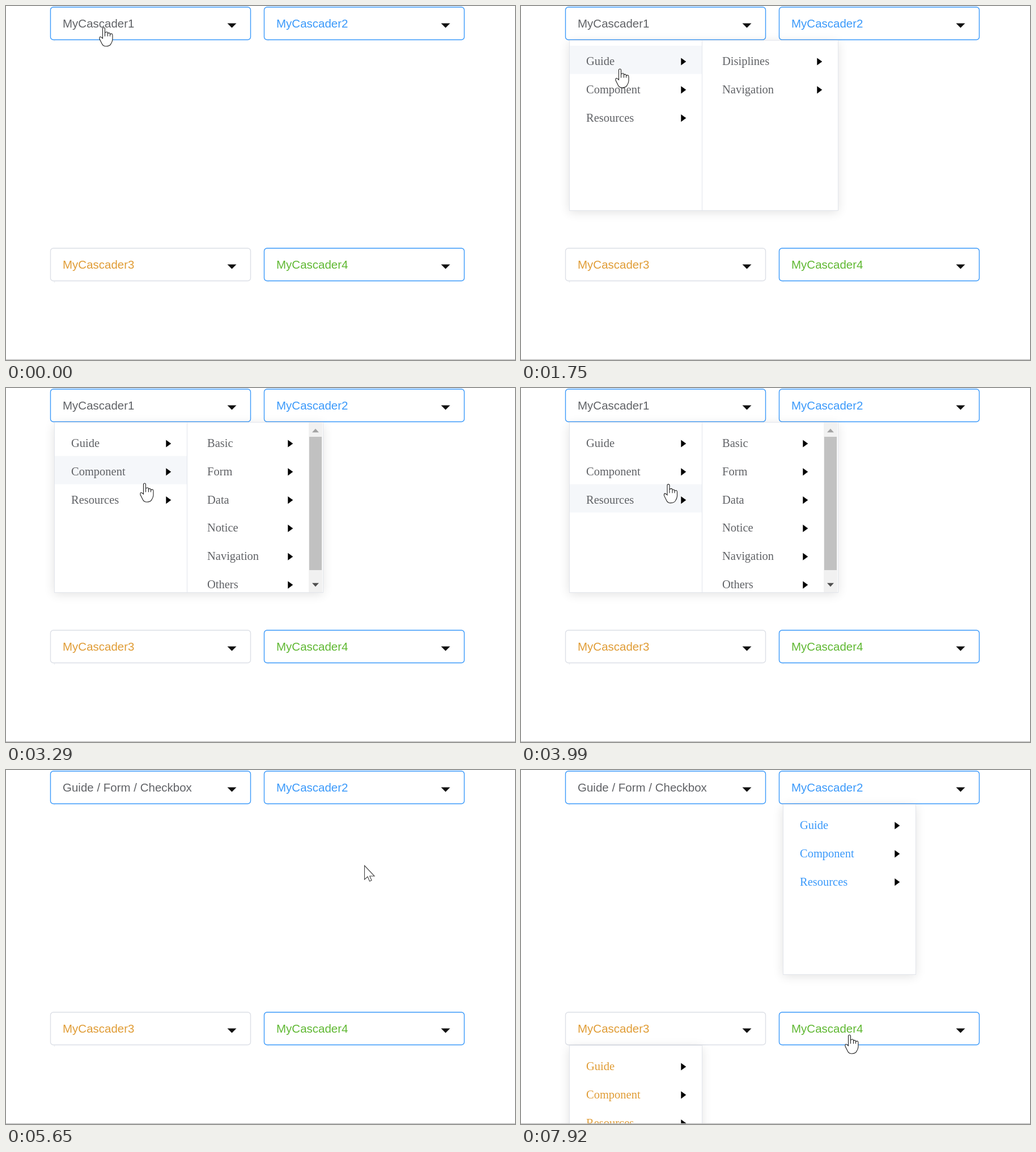
An HTML page with a canvas for the animation above (7.99 s loop, 898 by 624 pixels).

```html
<!DOCTYPE html>
<html lang="en">
<head>
<meta charset="utf-8">
<title>Cascaders</title>
<style>
  html, body { margin: 0; width: 100%; height: 100%; overflow: hidden; background: #fff; }
  canvas { display: block; }
</style>
</head>
<body>
<canvas id="stage" width="898" height="624"></canvas>
<script>
const ctx = document.getElementById('stage').getContext('2d');
const LOOP = 7990, PRESS = 80, DELAY = 230;
const ZOOM = 1.465, ROW = 34 * ZOOM, FONT = 14 * ZOOM;
const COL = 240, FIELD_W = 353, FIELD_H = 57.5, MENU_H = 300;
const BLUE = '#3a99fa', GRAY = '#dcdfe6', LINE = '#e2e5eb';
const SANS = '"Liberation Sans", Arial, sans-serif';
const SERIF = '"Liberation Serif", "Times New Roman", serif';

const MAIN = ['Guide', 'Component', 'Resources'];
const GUIDE = ['Disiplines', 'Navigation'];
const NAV = ['Side Navigation', 'Top Navigation'];
const PARTS = ['Basic', 'Form', 'Data', 'Notice', 'Navigation', 'Others'];
const FORM = ['Radio', 'Checkbox', 'Input', 'InputNumber', 'Select', 'Cascader'];

const FIELDS = ['#606266', BLUE, '#e09c35', '#5fb832'].map((color, n) => ({
  color,
  border: n === 2 ? GRAY : BLUE,
  label: 'MyCascader' + (n + 1),
  x: 78.5 + 377 * (n % 2),
  y: 2 + 425 * Math.floor(n / 2),
}));

// Pointer moves; a click sets the open columns of a menu shortly after
const MOVES = [
  { from: 590, to: 740, x: 176, y: 37, click: 830, menu: 0, cols: [MAIN] },
  { from: 1290, to: 1440, x: 174.5, y: 111, click: 1440, menu: 0, cols: [MAIN, GUIDE] },
  { from: 1750, to: 2140, x: 396, y: 154, click: 2520, menu: 0, cols: [MAIN, GUIDE, NAV] },
  { from: 2750, to: 2980, x: 244.5, y: 168, click: 2980, menu: 0, cols: [MAIN, PARTS] },
  { from: 3890, to: 4460, x: 450, y: 190 },
  { from: 4630, to: 4780, x: 370.5, y: 150, click: 4860, menu: 0, cols: [MAIN, PARTS, FORM] },
  { from: 5090, to: 5420, x: 632, y: 168, click: 5420, menu: 0, cols: [], pick: 'Guide / Form / Checkbox' },
  { from: 5880, to: 6200, x: 615.5, y: 41, click: 6270, menu: 1, cols: [MAIN] },
  { from: 6500, to: 7200, x: 292, y: 431, click: 7220, menu: 2, cols: [MAIN] },
  { from: 7540, to: 7920, x: 579.5, y: 467 },
];

const HAND = new Path2D('M-2 19V2a2 2 0 0 1 4 0V9Q7 6 7 10Q11 8 11 12Q15.5 9 15.5 14V21' +
  'Q15 25 13 28Q11 33 4 33Q-1 33-3 29L-7.5 20Q-8-16-2 19ZM2 9V15.5M7 10V15.5M11 12V15.5'.replace('-8-16', '-8 13'));
const ARROW = new Path2D('M.5.5V25L6 20L9.5 28L13 26.5L9.7 19H18Z');

function stateAt(t) {
  const s = { x: 172.5, y: 38, pressed: false, menus: [[], [], [], []], picked: null };
  for (const m of MOVES) {
    const k = Math.min(1, Math.max(0, (t - m.from) / (m.to - m.from)));
    const ease = (1 - Math.cos(Math.PI * k)) / 2;
    s.x += (m.x - s.x) * ease;
    s.y += (m.y - s.y) * ease;
    if (t >= m.click && t < m.click + PRESS) s.pressed = true;
    if (t >= m.click + DELAY) {
      s.menus[m.menu] = m.cols;
      s.picked = m.pick || s.picked;
    }
  }
  return s;
}

function inside(p, x, y, w, h) {
  return p.x >= x && p.x < x + w && p.y >= y && p.y < y + h;
}

function rect(x, y, w, h, color) {
  ctx.fillStyle = color;
  ctx.fillRect(x, y, w, h);
}

// Triangle centred on x, y that points along the given angle
function triangle(x, y, length, half, angle, color) {
  ctx.save();
  ctx.translate(x, y);
  ctx.rotate(angle);
  ctx.fillStyle = color;
  ctx.beginPath();
  ctx.moveTo(-length / 2, -half);
  ctx.lineTo(length / 2, 0);
  ctx.lineTo(-length / 2, half);
  ctx.fill();
  ctx.restore();
}

function text(str, x, y, color, family) {
  ctx.font = FONT + 'px ' + family;
  ctx.fillStyle = color;
  ctx.fillText(str, x, y);
}

function drawField(f, label) {
  ctx.strokeStyle = f.border;
  ctx.lineWidth = 1.4;
  ctx.beginPath();
  ctx.roundRect(f.x, f.y, FIELD_W, FIELD_H, 5);
  ctx.stroke();
  text(label, f.x + 21.5, f.y + 35.5, f.color, SANS);
  triangle(f.x + 320, f.y + 32.5, 8, 8, Math.PI / 2, '#111');
  rect(f.x + 6, f.y + 59, 2, 1, '#e0e3e8');
}

function drawScrollbar(x, y, thumb) {
  rect(x, y, 24, MENU_H - 1, '#f1f1f1');
  rect(x + 1, y + 25, 22, thumb, '#c1c1c1');
  triangle(x + 12, y + 14, 6.5, 6, -Math.PI / 2, '#a3a3a3');
  triangle(x + 12, y + 286, 6.5, 6, Math.PI / 2, '#505050');
}

// Draws an open menu and tells whether the pointer is over an item
function drawMenu(f, cols, p) {
  const x = f.x + 6.5, y = f.y + 59, width = cols.length * COL - 6;
  let over = false;
  ctx.save();
  ctx.shadowColor = 'rgba(0,0,0,.12)';
  ctx.shadowBlur = 12 * ZOOM;
  ctx.shadowOffsetY = 2 * ZOOM;
  rect(x, y, width, MENU_H, '#fff');
  ctx.restore();
  ctx.strokeStyle = LINE;
  ctx.lineWidth = 1;
  ctx.strokeRect(x + 0.5, y - 0.5, width, MENU_H);

  cols.forEach((items, c) => {
    const left = x + c * COL + 1;
    const edge = x + (c + 1) * COL - 6;
    const right = items.length > 5 ? edge - 25 : edge;
    if (c) rect(left - 7, y, 1, MENU_H, LINE);
    items.forEach((item, i) => {
      const top = y + 9 + i * ROW;
      if (inside(p, left, top, right - left, ROW)) {
        over = true;
        rect(left, top, right - left, ROW, '#f5f7fa');
      }
      text(item, left + 29, top + 34, f.color, SERIF);
      if (c < 2) triangle(right - 32.2, top + 28, 9, 6.6, 0, '#000');
    });
    if (right < edge) drawScrollbar(right, y, c < 2 ? 235 : 111);
  });
  return over;
}

function drawPointer(p, hand) {
  const shape = hand ? HAND : ARROW;
  ctx.save();
  ctx.translate(p.x, p.y);
  ctx.fillStyle = '#fff';
  ctx.strokeStyle = hand ? '#222' : '#444';
  ctx.lineWidth = 1.1;
  ctx.fill(shape);
  ctx.stroke(shape);
  if (p.pressed) {
    ctx.strokeStyle = '#555';
    ctx.beginPath();
    ctx.arc(0.5, 0.5, 17, 0, 7);
    ctx.stroke();
  }
  ctx.restore();
}

function draw(now) {
  const s = stateAt(now % LOOP);
  let hand = false;
  rect(0, 0, 898, 624, '#fff');
  FIELDS.forEach((f, n) => {
    drawField(f, n === 0 && s.picked || f.label);
    if (inside(s, f.x, f.y, FIELD_W, FIELD_H)) hand = true;
  });
  FIELDS.forEach((f, n) => {
    if (s.menus[n].length && drawMenu(f, s.menus[n], s)) hand = true;
  });
  rect(0, 622.7, 898, 1.3, '#bfbfbf');
  drawPointer(s, hand);
  requestAnimationFrame(draw);
}
requestAnimationFrame(draw);
</script>
</body>
</html>
```
